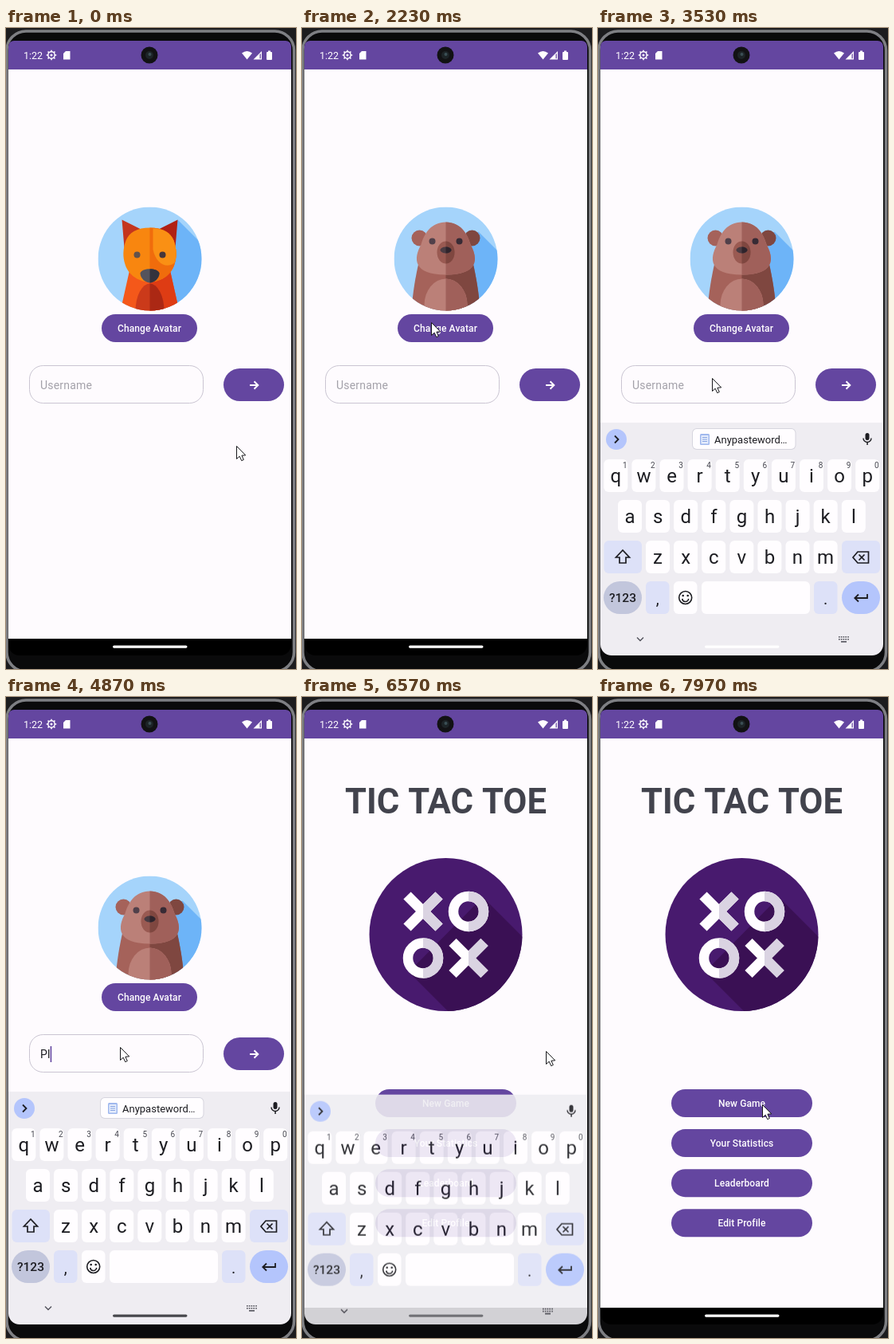
Write an HTML page with a canvas that moves like this. It is 364 px wide and 804 px high and loops after 8000 ms.

```html
<!DOCTYPE html>
<html lang="en">
<head>
<meta charset="utf-8">
<title>Game sign-in</title>
<style>
html, body { margin: 0; width: 100%; height: 100%; overflow: hidden; background: #141415; }
canvas { display: block; width: 364px; height: 804px; }
</style>
</head>
<body>
<canvas id="stage"></canvas>
<script>
const W = 364, H = 804, LOOP = 8000, TAU = Math.PI * 2;
const PAGE = '#fefbfe', PURPLE = '#6446a0', INK = '#1d1d22', WHITE = '#fffdff';
const dpr = window.devicePixelRatio || 1;

function makeContext(canvas) {
  canvas.width = W * dpr;
  canvas.height = H * dpr;
  const c = canvas.getContext('2d');
  c.scale(dpr, dpr);
  return c;
}
const main = makeContext(document.getElementById('stage'));
const buffer = makeContext(document.createElement('canvas'));
let g = main;

// Timing helpers
const clamp = v => Math.max(0, Math.min(1, v));
const ramp = (t, a, b) => clamp((t - a) / (b - a));
const easeOut = p => 1 - (1 - p) ** 3;
const smooth = p => p * p * (3 - 2 * p);

// Drawing helpers
function fill(color) { g.fillStyle = color; g.fill(); }
function rect(x, y, w, h, color) { g.fillStyle = color; g.fillRect(x, y, w, h); }
function round(x, y, w, h, r, color) { g.beginPath(); g.roundRect(x, y, w, h, r); fill(color); }
function oval(x, y, rx, ry, color) { g.beginPath(); g.ellipse(x, y, rx, ry, 0, 0, TAU); fill(color); }
function disc(x, y, r, color) { oval(x, y, r, r, color); }
function poly(points, color) {
  g.beginPath();
  points.forEach(([x, y]) => g.lineTo(x, y));
  g.closePath();
  fill(color);
}
function line(points, color, width) {
  g.beginPath();
  points.forEach(([x, y]) => g.lineTo(x, y));
  g.strokeStyle = color;
  g.lineWidth = width;
  g.stroke();
}
function shape(d, color) { g.fillStyle = color; g.fill(new Path2D(d)); }
function text(str, x, y, size, color, { weight = 400, align = 'left', gap = 0 } = {}) {
  g.font = `${weight} ${size}px Roboto, sans-serif`;
  g.letterSpacing = gap + 'px';
  g.textAlign = align;
  g.fillStyle = color;
  g.fillText(str, x, y);
}
// Paints a shape twice so its right half takes the second colour.
function halves(paint, left, right) {
  paint(left);
  g.save();
  g.beginPath();
  g.rect(0, -300, 300, 600);
  g.clip();
  paint(right);
  g.restore();
}
function layer(alpha, dx, dy, draw) {
  if (alpha <= 0) return;
  g = buffer;
  g.clearRect(0, 0, W, H);
  draw();
  g = main;
  g.globalAlpha = alpha;
  g.drawImage(buffer.canvas, dx, dy, W, H);
  g.globalAlpha = 1;
}

// Avatars are drawn around 0,0 inside a circle of radius 65.
function eyes(x, y, r, left, right) { disc(-x, y, r, left); disc(x, y, r, right); }

function backdrop(x, y, color, shade) {
  rect(-65, -65, 130, 130, color);
  poly([[x, y], [x + 60, y + 60], [70, 70], [20, 70], [15, 0]], shade);
}
function sky(x, y) { backdrop(x, y, '#a5d4fb', '#6db4f8'); }

function dog() {
  sky(35, -49);
  halves(c => shape('M-24 8 L-37 66 H37 L24 8Z', c), '#f4581a', '#de3c14');
  halves(c => oval(0, 66, 18, 35, c), '#cb3a1a', '#ab2814');
  poly([[-35, -49], [-11, -37], [-32, -14]], '#c4351e');
  poly([[35, -49], [11, -37], [32, -14]], '#b02014');
  halves(c => shape('M0 -39 C16 -39 26 -33 30 -23 C34 -12 34 -2 31 7 C28 18 16 29 0 29 C-16 29 -28 18 -31 7 C-34 -2 -34 -12 -30 -23 C-26 -33 -16 -39 0 -39Z', c), '#f8860f', '#f06c0c');
  shape('M4 -38 C16 -38 26 -33 30 -23 C34 -12 34 -2 31 5 C22 12 8 8 4 -12Z', '#fa9014');
  eyes(16, -5, 4, '#63524c', '#46363a');
  halves(c => shape('M-12 18 C-10 11 10 11 12 18 C12 25 5 30 0 30 C-5 30 -12 25 -12 18Z', c), '#54535c', '#34333d');
}
function bear() {
  sky(41, -34);
  eyes(33, -26, 10, '#a5625a', '#7f4740');
  halves(c => shape('M-34 5 C-38 22 -42 45 -43 66 H43 C42 45 38 22 34 5Z', c), '#a5625a', '#7f4740');
  halves(c => oval(0, 58, 27, 33, c), '#bb8078', '#a0605a');
  halves(c => shape('M0 -46 C18 -46 27 -32 31 -18 C41 0 41 20 0 20 C-41 20 -41 0 -31 -18 C-27 -32 -18 -46 0 -46Z', c), '#bb8078', '#a0605a');
  halves(c => oval(0, -8, 11, 14, c), '#9a5a52', '#7f4740');
  halves(c => oval(0, -11, 7, 4, c), '#4a3b42', '#2f242c');
  eyes(17, -22, 4, '#51404a', '#382b35');
}
function koala() {
  backdrop(38, -40, '#1cd86c', '#14c45e');
  eyes(33, -25, 14, '#60646e', '#3c3f4a');
  halves(c => shape('M-28 10 C-40 22 -42 42 -41 66 H41 C42 42 40 22 28 10Z', c), '#5c606b', '#3c3f4a');
  halves(c => oval(0, 50, 31, 28, c), '#868a94', '#6c707c');
  halves(c => oval(0, -14, 33, 33, c), '#7e828c', '#666a76');
  eyes(15, -14, 3.5, '#3b3e48', '#292c36');
  halves(c => round(-5, -12, 10, 18, 5, c), '#454954', '#2c2f3a');
}
function blank() {
  rect(-65, -65, 130, 130, '#505b7d');
  shape('M-23 -25 C-25 -52 25 -52 23 -25 L23 -12 C27 -10 25 2 20 3 C18 13 14 18 14 22 V30 C16 42 42 42 48 55 V66 H-48 V55 C-42 42 -16 42 -14 30 V22 C-14 18 -18 13 -20 3 C-25 2 -27 -10 -23 -12Z', '#e6ebee');
}
function sunny() {
  disc(0, 0, 62.5, '#f4cf38');
  oval(-42, 14, 15, 26, '#f9df72');
  oval(42, 14, 15, 26, '#f9df72');
}
function man() {
  sunny();
  shape('M-58 66 C-56 32 -34 22 -14 16 H14 C34 22 56 32 58 66Z', '#5590e2');
  poly([[-22, 18], [22, 18], [24, 66], [-24, 66]], '#eceafb');
  poly([[-24, 20], [-14, 17], [-16, 66], [-30, 66]], '#8fb8f4');
  poly([[24, 20], [14, 17], [16, 66], [30, 66]], '#8fb8f4');
  poly([[-11, 0], [11, 0], [13, 20], [0, 32], [-13, 20]], '#b57e60');
  shape('M-24 -24 C-28 -56 -14 -66 0 -66 C14 -66 28 -58 24 -24Z', '#4c3a4c');
  halves(c => shape('M-19 -46 C-8 -50 8 -50 19 -46 L23 -20 C22 0 12 8 0 8 C-12 8 -22 0 -23 -20Z', c), '#b9805e', '#d29c70');
  shape('M-23 -22 C-20 -14 -16 -9 -12 -9 C-9 -18 9 -18 12 -9 C16 -9 20 -14 23 -22 C23 -4 14 9 0 9 C-14 9 -23 -4 -23 -22Z', '#4a3844');
  oval(0, -7, 7, 3, '#e3b09c');
}
function woman() {
  sunny();
  disc(0, -57, 11, '#4c3a50');
  shape('M-23 -16 C-27 -44 -14 -56 0 -56 C14 -56 27 -44 23 -16Z', '#4c3a50');
  line([[-10, -50], [0, -53], [10, -50]], '#f3eef8', 3);
  shape('M-55 66 C-52 34 -32 28 -14 18 H14 C32 28 52 34 55 66Z', '#5896e8');
  poly([[-10, 4], [10, 4], [12, 18], [-12, 18]], '#e79a8c');
  poly([[-14, 15], [14, 15], [17, 27], [0, 33], [-20, 27]], '#4480d2');
  halves(c => shape('M0 -45 C10 -36 20 -34 20 -18 C20 2 10 17 0 17 C-10 17 -20 2 -20 -18 C-20 -34 -10 -36 0 -45Z', c), '#f0a596', '#fcbcaa');
  shape('M18 -20 C26 2 27 28 19 48 C8 36 9 20 14 8Z', '#40304a');
}
function avatar(paint, y, r) {
  g.save();
  g.translate(180.5, y);
  g.scale(r / 65, r / 65);
  g.beginPath();
  g.arc(0, 0, 65, 0, TAU);
  g.clip();
  paint();
  g.restore();
}

// Pages
function pageBack() { rect(3, 52, 355, 714, PAGE); }

function button(label, x, y, w) {
  round(x, y, w, 35, 17.5, PURPLE);
  text(label, x + w / 2, y + 22, 12, WHITE, { weight: 500, align: 'center', gap: 0.1 });
}

const typing = [[3980, 'P'], [4480, 'Pl'], [4930, 'Pla'], [5030, 'Play'], [5140, 'Playe'], [5250, 'Player']];

function signIn(t) {
  pageBack();
  avatar(t < 1300 ? dog : bear, 289.5, 65);
  button('Change Avatar', 120, 359, 120);
  g.beginPath();
  g.roundRect(29.5, 423.5, 218, 47, 17);
  g.strokeStyle = '#cac5d2';
  g.lineWidth = 1;
  g.stroke();
  const typed = typing.filter(k => k[0] <= t).pop();
  if (typed) text(typed[1], 43, 453, 14, INK, { gap: 0.2 });
  else text('Username', 43, 453, 14, '#a3a1a9', { gap: 0.2 });
  const since = t - (typed ? typed[0] : 2700);
  if (since >= 0 && since % 1000 < 500) {
    const end = typed ? g.measureText(typed[1]).width : 0;
    rect(43 + end, 438, 1.6, 20, PURPLE);
  }
  round(273, 427, 76, 41, 20.5, PURPLE);
  line([[306, 448], [316, 448]], WHITE, 2);
  line([[311.5, 443.3], [316.3, 448], [311.5, 452.7]], WHITE, 2);
}

function avatarList() {
  pageBack();
  g.save();
  g.beginPath();
  g.rect(3, 52, 355, 714);
  g.clip();
  [blank, bear, dog, koala, man, woman, () => sky(35, -49)]
    .forEach((paint, i) => avatar(paint, 110 + i * 117.7, 52));
  g.restore();
}

const TILE = '#dad3e2';
function cross(x, y) {
  g.save();
  g.translate(x, y);
  halves(c => {
    line([[-20, -20], [20, 20]], c, 13);
    line([[20, -20], [-20, 20]], c, 13);
  }, WHITE, TILE);
  g.restore();
}
function ring(x, y) {
  g.save();
  g.translate(x, y);
  halves(c => {
    g.beginPath();
    g.arc(0, 0, 19, 0, TAU);
    g.strokeStyle = c;
    g.lineWidth = 12.5;
    g.stroke();
  }, WHITE, TILE);
  g.restore();
}
function menu() {
  pageBack();
  text('TIC TAC TOE', 180.5, 146, 43.6, '#42434d', { weight: 700, align: 'center' });
  g.save();
  g.beginPath();
  g.arc(180.5, 298, 96, 0, TAU);
  fill('#481a6e');
  g.clip();
  poly([[227, 251], [300, 324], [300, 411], [200, 411], [134, 345]], '#3a1054');
  g.restore();
  cross(152, 269);
  ring(209, 269);
  ring(152, 327.5);
  cross(209, 327.5);
  ['New Game', 'Your Statistics', 'Leaderboard', 'Edit Profile']
    .forEach((label, i) => button(label, 92, 492 + i * 50.1, 177));
}

// Keyboard
function key(x, y, w, color = WHITE, r = 6) { round(x, y, w, 41, r, color); }

function keyRow(letters, x0, y, hints) {
  [...letters].forEach((ch, i) => {
    const x = x0 + i * 35.1;
    key(x - 15, y, 30);
    text(ch, x, y + 28.5, 24, INK, { align: 'center' });
    if (hints) text(String((i + 1) % 10), x + 11.5, y + 11, 10, '#45464f', { align: 'center' });
  });
}

function keyboard(t) {
  const tint = '#dde1f8', accent = '#b4c5fc';
  rect(3, 495, 355, 300, '#efedf2');
  disc(23, 516, 13, accent);
  line([[21, 511.5], [25.5, 516], [21, 520.5]], INK, 1.8);
  if (t < 6200) {
    round(118, 502, 130.5, 27, 6, '#d6d5de');
    round(119, 503, 128.5, 25, 5, WHITE);
    round(128, 509, 12, 14, 1.5, '#9fb8ee');
    rect(129.5, 511, 9, 10.5, '#e6edfc');
    [513, 515.5, 518].forEach(y => rect(131, y, 6, 1, '#86a3e2'));
    text('Anypasteword…', 146, 521, 13, INK);
  }
  round(335.5, 508, 5, 9, 2.5, INK);
  g.beginPath();
  g.arc(338, 514.5, 5, 0, Math.PI);
  g.strokeStyle = INK;
  g.lineWidth = 1.4;
  g.stroke();
  rect(337.3, 519, 1.5, 4, INK);

  keyRow('qwertyuiop', 22.3, 541, true);
  keyRow('asdfghjkl', 40, 592);
  keyRow('zxcvbnm', 75, 643);
  key(7.5, 643, 47.5, tint);
  line([[31, 655], [22.5, 664], [27, 664], [27, 671], [35, 671], [35, 664], [39.5, 664], [31, 655], [29.5, 656.5]], INK, 1.7);
  key(306, 643, 48, tint);
  line([[320, 664], [326, 657], [339.5, 657], [339.5, 671], [326, 671], [320, 664], [321, 663]], INK, 1.7);
  line([[327.5, 660.5], [334.5, 667.5]], INK, 1.7);
  line([[334.5, 660.5], [327.5, 667.5]], INK, 1.7);

  key(7, 694, 48, '#c2c6dc', 20.5);
  text('?123', 31, 720, 15.5, INK, { weight: 500, align: 'center' });
  key(60, 694, 29.5, tint);
  text(',', 74.7, 723, 20, INK, { align: 'center' });
  key(95, 694, 29.5);
  g.lineWidth = 1.6;
  g.strokeStyle = INK;
  g.beginPath();
  g.arc(109.7, 714.5, 8, 0, TAU);
  g.stroke();
  disc(106.7, 712, 1.3, INK);
  disc(112.7, 712, 1.3, INK);
  g.beginPath();
  g.arc(109.7, 715.5, 4, 0.1, Math.PI - 0.1);
  g.stroke();
  key(130, 694, 136);
  key(271, 694, 29.5, tint);
  text('.', 285.7, 723, 20, INK, { align: 'center' });
  key(306, 694, 48, accent, 20.5);
  line([[338, 710], [338, 715], [322.5, 715]], INK, 1.8);
  line([[327, 710.5], [322.3, 715], [327, 719.5]], INK, 1.8);

  line([[49, 764.5], [53, 768.5], [57, 764.5]], '#53535c', 1.4);
  for (let i = 0; i < 10; i++) rect(302 + (i % 5) * 2.8, 763 + (i > 4) * 3, 1.6, 1.6, '#53535c');
  rect(305, 769, 7, 1.6, '#53535c');
}

// Phone body and system bars
function phone() {
  rect(0, 0, W, H, '#1c1c1e');
  g.beginPath();
  g.roundRect(1, 4, 360.5, 803, 24);
  fill('#0a0a0b');
  g.strokeStyle = '#7e7f83';
  g.lineWidth = 3.5;
  g.stroke();
}

function statusBar() {
  rect(3, 16, 355, 36, PURPLE);
  text('1:22', 22, 39, 12.5, WHITE);
  g.strokeStyle = WHITE;
  g.lineWidth = 1.5;
  g.beginPath();
  g.arc(57, 34, 4.2, 0, TAU);
  g.stroke();
  for (let i = 0; i < 8; i++) {
    const a = i * TAU / 8, c = Math.cos(a), s = Math.sin(a);
    line([[57 + c * 4, 34 + s * 4], [57 + c * 6.3, 34 + s * 6.3]], WHITE, 1.6);
  }
  disc(57, 34, 1.5, WHITE);
  poly([[75, 29], [80.5, 29], [80.5, 39.5], [72, 39.5], [72, 32]], WHITE);
  g.beginPath();
  g.moveTo(302.5, 39.5);
  g.lineTo(296, 31.5);
  g.quadraticCurveTo(302.5, 26.5, 309, 31.5);
  g.closePath();
  fill(WHITE);
  poly([[321, 29], [321, 39.5], [310.5, 39.5]], WHITE);
  poly([[318.5, 33], [319.8, 32], [319.8, 38.3], [318.5, 38.3]], PURPLE);
  round(327, 30, 7, 10, 1, WHITE);
  rect(329, 28.5, 3, 2, WHITE);
  disc(180, 34, 10.5, '#121214');
  disc(180, 34, 5, '#1d2427');
  disc(180.5, 33, 2, '#3b4f55');
}

// Pointer route: time, x, y
const route = [
  [20, 289, 524], [340, 192, 380], [770, 192, 380], [830, 182, 379], [1150, 184, 378],
  [1470, 166, 222], [1650, 166, 222], [1730, 164, 230], [1890, 164, 230], [2230, 162, 369],
  [2600, 143, 439], [5680, 143, 439], [5840, 248, 456], [5960, 248, 456], [6180, 306, 444],
  [6800, 306, 444], [7600, 232, 498], [7900, 206, 511], [8000, 206, 511]
];
function pointer(t) {
  const n = route.findIndex(k => k[0] >= t);
  const b = route[n], a = route[Math.max(0, n - 1)];
  const p = a === b ? 0 : smooth(ramp(t, a[0], b[0]));
  g.save();
  g.translate(a[1] + (b[1] - a[1]) * p + 0.5, a[2] + (b[2] - a[2]) * p + 0.5);
  poly([[0, 0], [0, 16], [3.7, 12.7], [6.2, 18.2], [8.8, 17], [6.4, 11.7], [11.2, 11.4]], '#fff');
  g.strokeStyle = '#17171b';
  g.lineWidth = 1;
  g.stroke();
  g.restore();
}

function draw(t) {
  g = main;
  phone();
  g.save();
  g.beginPath();
  g.roundRect(3, 16, 355, 771, [7, 7, 14, 14]);
  g.clip();
  rect(3, 16, 355, 771, '#000');
  signIn(t);

  const opened = ramp(t, 430, 600), closed = ramp(t, 1930, 2090);
  layer(Math.min(1, opened * 2) * (1 - closed), 36 * (1 - easeOut(opened)) + 36 * closed * closed, 0, avatarList);
  const entered = ramp(t, 6290, 6480);
  layer(Math.min(1, entered * 2), 36 * (1 - easeOut(entered)), 0, menu);

  const shown = ramp(t, 3350, 3530), hidden = ramp(t, 6525, 6725);
  const dark = ramp(t, 4100, 4300) * (1 - hidden);
  layer(Math.min(1, shown * 2) * (1 - hidden ** 1.45), 0, 69 * (1 - easeOut(shown) + hidden * hidden), () => keyboard(t));
  statusBar();
  round(134, 774.5, 93.5, 3.2, 1.6, '#fff');
  g.globalAlpha = dark;
  round(134, 774.5, 93.5, 3.2, 1.6, '#46464c');
  g.globalAlpha = 1;
  g.restore();
  pointer(t);
}

const start = performance.now();
function tick() {
  draw((performance.now() - start) % LOOP);
  requestAnimationFrame(tick);
}
tick();
</script>
</body>
</html>
```
